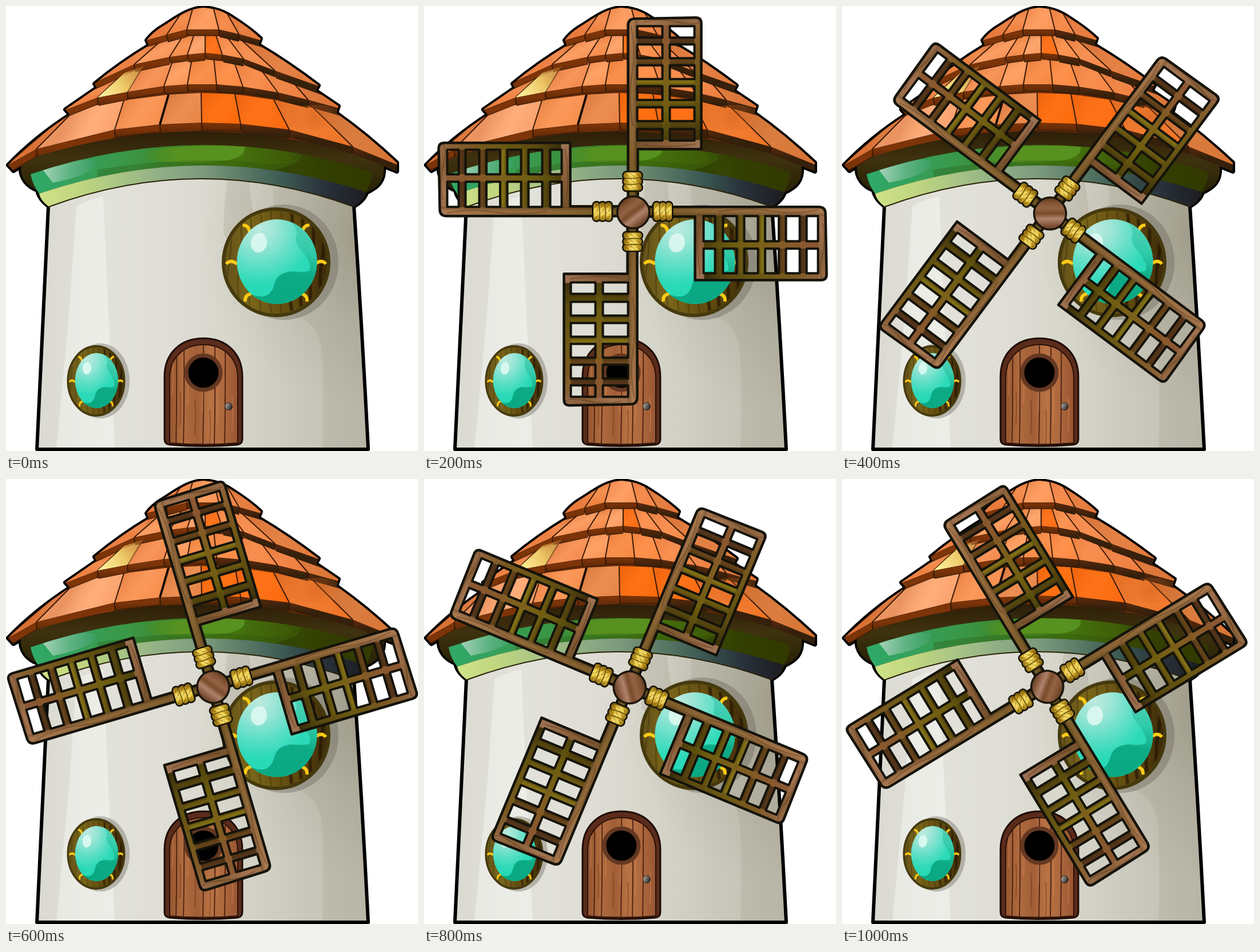
Animation, 720 px wide and 778 px high, one loop 1200 ms. Source, as an HTML page with a canvas:

```html
<!DOCTYPE html>
<html lang="en">
<head>
<meta charset="utf-8">
<title>Windmill</title>
<style>
  html, body { margin: 0; width: 100%; height: 100%; overflow: hidden; background: #fff; }
  canvas { display: block; }
</style>
</head>
<body>
<canvas id="stage" width="720" height="778"></canvas>
<script>
const W = 720, H = 778, STEP = 200, TAU = Math.PI * 2;
const stage = document.getElementById('stage').getContext('2d');
const house = document.createElement('canvas');
house.width = W;
house.height = H;
let c = house.getContext('2d');

// Sail poses: centre x, centre y, degrees. The first step has no sails.
const poses = [
  null,
  [364.6, 359.2, 0],
  [362.4, 361.2, 36.7],
  [360.9, 361.9, 73.6],
  [358.2, 362.8, 112.6],
  [357.6, 361.7, 148.7]
];

function grad(x0, y0, x1, y1, ...colors) {
  const g = c.createLinearGradient(x0, y0, x1, y1);
  colors.forEach((col, i) => g.addColorStop(i / (colors.length - 1), col));
  return g;
}

function glow(x, y, r, ...colors) {
  const g = c.createRadialGradient(x, y, 0, x, y, r);
  colors.forEach((col, i) => g.addColorStop(i / (colors.length - 1), col));
  return g;
}

function paint(shape, fill, stroke, width) {
  const p = typeof shape === 'string' ? new Path2D(shape) : shape;
  if (fill) { c.fillStyle = fill; c.fill(p); }
  if (stroke) { c.strokeStyle = stroke; c.lineWidth = width; c.stroke(p); }
}

function oval(x, y, rx, ry, fill, stroke, width, tilt = 0) {
  const p = new Path2D();
  p.ellipse(x, y, rx, ry, tilt, 0, TAU);
  paint(p, fill, stroke, width);
}

function box(x, y, w, h, fill) {
  c.fillStyle = fill;
  c.fillRect(x, y, w, h);
}

function clipped(path, draw, rule = 'nonzero') {
  c.save();
  c.clip(path, rule);
  draw();
  c.restore();
}

const roof = new Path2D('M345,3 C318,4 296,22 270,38 Q256,47 246,60 L250,69 Q200,99 155,136 L159,143 L104,181 L112,190 Q50,230 4,278 L13,288 L54,263 Q330,177 608,259 L683,289 V274 Q632,226 577,187 L581,175 L541,148 L546,139 Q495,100 441,68 L445,57 C425,38 405,26 388,15 Q368,4 345,3Z');

function drawOutlines() {
  paint(roof, null, '#000', 8);
  paint('M26,280 C24,301 38,316 55,322 Q58,338 75,350 M660,280 C662,306 650,317 630,326 Q626,340 608,350', null, '#000', 8);
}

function drawWall() {
  const wall = new Path2D('M74,350 Q65,560 54,775 H633 Q622,560 608,350 Q341,253 74,350Z');
  paint(wall, grad(55, 0, 633, 0, '#dadad2', '#e2e2da', '#dfded6', '#d6d5ca', '#cac8bc', '#c0bdb0'));
  clipped(wall, () => {
    box(0, 290, W, 490, glow(650, 400, 310, 'rgba(112,106,84,.4)', 'rgba(112,106,84,.14)', 'rgba(112,106,84,0)'));
    paint('M123,350 Q145,338 170,333 Q176,480 182,600 L190,774 H88 L110,540Z', 'rgba(255,255,255,.36)');
    paint('M388,300 H424 Q427,330 432,362 L388,410 L380,400 Q380,350 388,300Z', 'rgba(110,105,80,.13)');
    paint('M466,305 L472,540 Q553,535 553,620 Q556,700 553,774 H640 V300Z', 'rgba(110,105,80,.1)');
  });
  paint('M74,350 Q65,560 54,775 H633 Q622,560 608,350', null, '#000', 6);
}

function drawEave() {
  paint('M26,280 C24,301 38,316 55,322 Q58,338 75,351 Q341,253 608,351 Q626,340 630,326 C650,317 662,306 660,280 L590,235 Q340,190 90,235Z',
    grad(0, 215, 0, 320, '#2b1d08', '#3f320f', '#292306'));
  const green = new Path2D('M43,294 Q341,194 639,290 Q640,310 628,325 Q343,231 58,328 Q46,312 43,294Z');
  paint(green, grad(43, 0, 640, 0, '#2fa968', '#35a05a', '#3a9646', '#3c8529', '#45780f', '#406009', '#3b4a03', '#384100'));
  clipped(green, () => {
    paint('M64,286 L120,270 Q158,266 157,276 Q154,291 105,304 L82,309Z', grad(64, 285, 157, 290, '#a3d3b7', '#5fb384', '#3a9f60'));
    paint('M250,252 Q340,240 417,246 Q420,264 385,270 Q330,276 262,272 Q225,262 250,252Z', grad(235, 0, 300, 0, 'rgba(87,145,31,0)', '#57911f'));
    paint('M160,286 Q300,264 420,272 Q500,284 515,262 Q512,254 490,250 L520,310 L160,320Z', 'rgba(40,75,10,.28)');
    paint('M515,254 Q522,276 470,286 L650,340 V270Z', 'rgba(40,45,0,.4)');
  });
  paint('M58,328 Q343,231 628,325 Q626,340 608,351 Q341,253 75,351 Q60,340 58,328Z',
    grad(60, 0, 628, 0, '#cfe287', '#bfd580', '#a8c486', '#8fae85', '#7c9a7d', '#5b7a66', '#3b5953', '#29313a', '#1c1d22'));
  paint('M75,351 Q341,253 608,351', null, '#2a2208', 2);
}

// Each seam: top x, top y, bottom x, bottom y; neighbours enclose one tile.
const tiers = [
  { lip: 13, seams: [[112, 184, 0, 280], [122, 180, 53, 250], [206, 165, 190, 216], [284, 155, 269, 207],
    [341, 152, 342, 204], [400, 154, 410, 206], [468, 164, 495, 216], [535, 176, 606, 246], [578, 180, 690, 280]],
    tones: ['#d9763c', '#ffae7c', '#fa9657', '#e88a4e', '#ff6a08', '#ff6a0c', '#ef7628', '#d47638'] },
  { lip: 12, seams: [[158, 136, 98, 184], [205, 118, 160, 160], [240, 105, 212, 150], [292, 94, 276, 140],
    [325, 92, 317, 137], [363, 92, 368, 137], [398, 96, 414, 141], [440, 104, 475, 151], [490, 120, 528, 164], [545, 142, 586, 180]],
    tones: ['#f08a4c', '#ffe283', '#f69258', '#ffa064', '#f98d48', '#ff8e48', '#f78b4c', '#ee8244', '#d97438'] },
  { lip: 11, seams: [[246, 66, 150, 136], [272, 60, 224, 102], [308, 54, 286, 89], [328, 52, 317, 85],
    [348, 50, 348, 82], [367, 52, 378, 85], [386, 54, 415, 92], [412, 60, 470, 113], [444, 66, 552, 142]],
    tones: ['#ee884c', '#fc9c62', '#f89354', '#ffa56e', '#ff6d12', '#fb9150', '#f68d4f', '#e07c40'] },
  { lip: 11, seams: [[300, -6, 238, 62], [312, 4, 281, 50], [327, 2, 316, 41], [362, 2, 372, 41], [381, 4, 407, 49], [400, -6, 452, 62]],
    tones: ['#ea8044', '#f28b4c', '#ff9d62', '#f4894a', '#e37a3e'] }
];

function drawRoof() {
  paint(roof, '#642a0a');
  clipped(roof, () => {
    for (const { seams, tones, lip } of tiers) {
      tones.forEach((tone, i) => {
        const [ax, ay, bx, by] = seams[i], [dx, dy, ex, ey] = seams[i + 1];
        const dark = i > tones.length / 2;
        const drop = lip + (i % 2) * 2;
        paint(`M${bx},${by} L${ex},${ey} V${ey + drop} L${bx + 2},${by + drop}Z`,
          grad(0, by, 0, by + drop + 4, dark ? '#5c290d' : '#7d3408', dark ? '#35200b' : '#552607'), '#2d1504', 1);
        const tile = new Path2D(`M${ax},${ay} L${dx},${dy} L${ex},${ey} L${bx},${by}Z`);
        paint(tile, tone);
        paint(tile, grad(ax, ay, ex, ey, 'rgba(170,65,10,.24)', 'rgba(255,170,110,.12)', 'rgba(225,90,15,.16)'));
        if (i) paint(`M${ax},${ay} L${bx},${by}`, null, '#3a1b07', 2);
      });
    }
    paint('M207,117 L241,105 L212,150 L160,160Z', grad(170, 158, 240, 112, '#ffef9a', '#ecc867', 'rgba(185,105,40,.5)'));
    oval(540, 195, 52, 22, glow(540, 195, 50, 'rgba(190,80,20,.3)', 'rgba(225,110,40,.25)', 'rgba(225,110,40,0)'));
    paint('M284,155 L269,207', null, '#180b03', 4);
  });
}

function drawWindow(x, y, sx, sy) {
  c.save();
  c.translate(x, y);
  c.scale(sx, sy);
  oval(14, 0, 95, 101, 'rgba(100,98,88,.38)');
  oval(0, 0, 92, 93, grad(-92, 0, 92, 0, '#63511a', '#7a671a', '#695413', '#59440e', '#3c2908'), '#45390e', 6);
  const frame = new Path2D();
  frame.ellipse(0, 0, 88, 89, 0, 0, TAU);
  clipped(frame, () => {
    for (let px = -82; px < 90; px += 18) {
      paint(`M${px},-95 Q${px + 7},-40 ${px},0 T${px + 3},95`, null, px > 10 ? 'rgba(30,18,2,.6)' : 'rgba(45,34,4,.32)', px > 10 ? 6 : 3);
    }
  });
  for (const deg of [0, 50, 130, 180, 230, 310]) {
    c.save();
    c.rotate(deg * Math.PI / 180);
    const bend = deg > 90 && deg < 270 ? 1 : -1;
    paint(`M68,${-3 * bend} Q80,${6 * bend} 87,${-3 * bend}`, null, '#ffcb16', 5.5);
    c.restore();
  }
  const glass = new Path2D();
  glass.ellipse(1.5, -1, 70, 74, 0, 0, TAU);
  paint(glass, glow(-30, -60, 130, '#bdebe0', '#98e5d5', '#5fdfc7', '#2cdab8', '#25d8b5'));
  clipped(glass, () => {
    paint('M28,-70 Q40,-55 34,-42 Q36,-28 50,-14 Q64,8 58,15 Q50,18 28,16 Q2,18 -3,38 Q-8,58 -24,60 Q-38,60 -46,54 L-40,90 L90,90 V-80Z',
      grad(40, -60, 20, 60, '#4ccfb4', '#2fcba9', '#0cab86', '#0aa983'));
  });
  oval(-30, -34, 14, 17, 'rgba(225,250,243,.85)', null, 0, .2);
  c.restore();
}

function drawDoor() {
  const outer = new Path2D('M277,648 C277,606 306,581 345,581 S413,606 413,648 V757 Q413,766 404,767 Q345,772 286,767 Q277,766 277,757Z');
  paint(outer, '#5b2c1b', '#1d0b05', 3);
  const inner = new Path2D('M286,650 C286,614 312,592 345,592 S405,614 405,650 V764 Q345,769 286,764Z');
  paint(inner, grad(286, 0, 405, 0, '#96552f', '#b06c3f', '#a25e36', '#b87244', '#ad673d', '#985632'), '#2a1108', 2);
  clipped(inner, () => {
    for (const x of [298, 311, 345, 365, 383]) {
      paint(`M${x},585 Q${x + 1},680 ${x - 1},770`, null, '#4a2010', 1.8);
    }
    for (let i = 0; i < 9; i++) {
      const x = 291 + i * 13, y = 620 + i * 53 % 90;
      paint(`M${x},${y} Q${x + 2},${y + 22} ${x},${y + 60}`, null, i % 2 ? 'rgba(95,45,22,.4)' : 'rgba(214,138,88,.4)', 2);
    }
  });
  oval(345, 641, 30, 30, '#000', '#653822', 7);
  oval(389, 700, 6.5, 6.5, grad(383, 697, 396, 703, '#aaa69f', '#66635f', '#171717'), '#2c1b12', 1);
}

// One sail pointing up; its cells stay open.
const sail = new Path2D('M-8,-12 V-325 Q-8,-337 4,-337 L110,-339 Q120,-339 120,-329 V-109 H9 V-12Z');
const rows = [[126, 16], [160, 20], [197, 20], [233.5, 20], [270, 20], [306, 16]];
const cells = new Path2D();
for (const [y, h] of rows) {
  for (const [x, w] of [[10, 40], [67, 39]]) cells.rect(x - 2, -y - h - 2, w + 4, h + 4);
}
const lattice = new Path2D(sail);
lattice.addPath(cells);

function drawSail() {
  clipped(lattice, () => {
    box(-10, -341, 134, 341, '#54430e');
    ['#54450e', '#6a5811', '#7f6d16', '#64421a', '#54341b'].forEach((tone, i) => {
      const top = -rows[i + 1][0], low = -rows[i][0] - rows[i][1];
      box(8, top, 100, low - top, grad(0, top, 0, low, tone, tone, '#3b2c08'));
    });
    box(52, -326, 13, 202, grad(0, -326, 0, -124, '#8c5834', '#87582a', '#7b601a', '#6d5d10', '#4b3f0a'));
    box(108, -341, 15, 234, grad(0, -341, 0, -107, '#966844', '#7b5822', '#6b5814', '#5a4910', '#2b2108'));
    box(-10, -341, 134, 16, grad(-10, 0, 122, 0, '#966846', '#a3734f', '#875f38', '#976b48'));
    box(8, -125, 116, 18, grad(8, 0, 122, 0, '#74522c', '#8b603a', '#9e7354'));
    box(-10, -341, 18, 341, grad(0, -341, 0, -10, '#a5744f', '#92663e', '#835e30', '#7e592c', '#6b4f1d', '#504010'));
    box(-10, -341, 18, 341, grad(-8, 0, 8, 0, 'rgba(210,160,110,.1)', 'rgba(200,150,95,.22)', 'rgba(35,20,4,.3)'));
    paint('M-3,-325 Q6,-280 -1,-240 T0,-150 M20,-332 Q50,-338 80,-331 T118,-332 M20,-116 Q60,-110 110,-118', null, 'rgba(60,28,10,.3)', 2);
  }, 'evenodd');
  paint(cells, null, '#15130b', 4);
  paint(sail, null, '#15130b', 4.5);
  drawRope();
}

function drawRope() {
  const rope = new Path2D();
  const turns = [-68.5, -58, -47.5];
  for (const y of turns) rope.roundRect(-16, y, 32, 11, 5);
  paint(rope, null, '#14110a', 5);
  paint(rope, grad(-16, 0, 16, 0, '#8a6a12', '#dcb836', '#f5db62', '#cba028', '#7c5b0b'));
  for (const y of turns) {
    paint(`M-14,${y + 10} Q0,${y + 12} 14,${y + 9}`, null, '#66500f', 1.6);
    for (const x of [-10, 0, 10]) paint(`M${x - 3},${y + 2} L${x + 3},${y + 8}`, null, 'rgba(120,86,12,.6)', 1.5);
    paint(`M-8,${y + 4} H6`, null, 'rgba(255,240,135,.6)', 2);
  }
}

function drawHub() {
  oval(0, 0, 28, 28, grad(-17, -22, 17, 22, '#5e3c1c', '#825334', '#946345', '#7a4b2b', '#ae836b', '#8a5c41', '#5f3b22'), '#1c150c', 3.5);
}

function drawSails([x, y, deg]) {
  const turn = deg * Math.PI / 180;
  for (let i = 0; i < 4; i++) {
    c.save();
    c.translate(x, y);
    c.rotate(turn + i * Math.PI / 2);
    drawSail();
    c.restore();
  }
  c.save();
  c.translate(x + 1.2, y + 1.6);
  c.rotate(turn);
  drawHub();
  c.restore();
}

c.lineJoin = 'round';
drawOutlines();
drawWall();
drawEave();
drawRoof();
drawWindow(472, 448, 1, 1);
drawWindow(157.5, 655.5, .537, .65);
drawDoor();

c = stage;
c.lineJoin = 'round';
const start = performance.now();

function tick() {
  const elapsed = performance.now() - start;
  const pose = poses[Math.floor(elapsed / STEP) % poses.length];
  box(0, 0, W, H, '#fff');
  c.drawImage(house, 0, 0);
  if (pose) drawSails(pose);
  requestAnimationFrame(tick);
}
tick();
</script>
</body>
</html>
```
